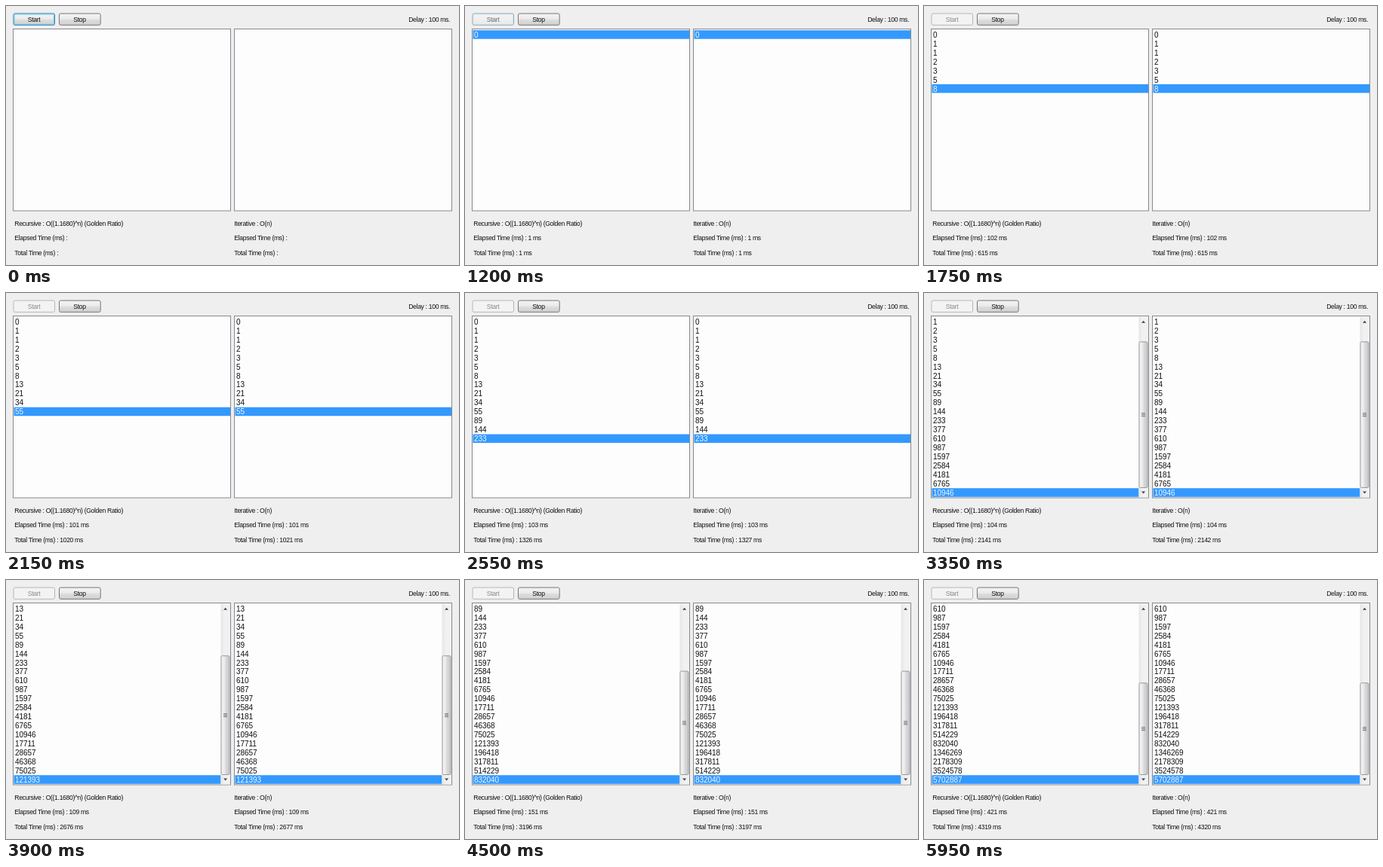
Recreate the animation shown at these times as an HTML page. Size 600 px wide and 344 px high, loop 6000 ms.

```html
<!DOCTYPE html>
<html lang="en">
<head>
<meta charset="utf-8">
<title>Fibonacci: recursive and iterative</title>
<style>
html, body { margin: 0; width: 100%; height: 100%; overflow: hidden; background: #efefef; }
svg { display: block; }
text { font: 8.6px "Liberation Sans", Arial, sans-serif; letter-spacing: -.33px; fill: #111; white-space: pre; }
.num { font-size: 10px; letter-spacing: -.04px; }
.list { fill: #fdfdfd; stroke: #858990; }
.mid { text-anchor: middle; }
</style>
</head>
<body>
<svg width="600" height="344" viewBox="0 0 600 344">
  <defs>
    <linearGradient id="face" x2="0" y2="1">
      <stop stop-color="#f4f4f4"/><stop offset=".48" stop-color="#ebebeb"/>
      <stop offset=".52" stop-color="#dedede"/><stop offset="1" stop-color="#d0d0d0"/>
    </linearGradient>
    <linearGradient id="thumb">
      <stop stop-color="#f6f6f6"/><stop offset=".45" stop-color="#e8e8ea"/>
      <stop offset=".55" stop-color="#d8d8da"/><stop offset="1" stop-color="#cbcbce"/>
    </linearGradient>
    <linearGradient id="track">
      <stop stop-color="#e6e6e6"/><stop offset=".4" stop-color="#f1f1f1"/><stop offset="1" stop-color="#f1f1f1"/>
    </linearGradient>
  </defs>
  <g>
    <rect x="10" y="10" width="54.5" height="15.3" rx="2" fill="#f3f3f3" stroke="#b4b8ba"/>
    <text class="mid" x="37" y="20.9" style="fill:#8b8b8b">Start</text>
  </g>
  <g id="start">
    <rect x="10" y="10" width="54.5" height="15.3" rx="2" fill="url(#face)" stroke="#3c86b5"/>
    <rect x="11" y="11" width="52.5" height="13.3" rx="1.2" fill="none" stroke="#62c8ee"/>
    <text class="mid" x="37" y="20.9">Start</text>
  </g>
  <rect x="70.5" y="10" width="54.7" height="15.3" rx="2" fill="url(#face)" stroke="#777"/>
  <text class="mid" x="97.5" y="20.9">Stop</text>
  <text x="588" y="20.9" text-anchor="end">Delay : 100 ms.</text>
  <g id="left"></g>
  <g id="right"></g>
</svg>
<script>
const LOOP = 6000, BEGIN = 1130, ROWS = 20, ROW = 11.95, TOP = 32.2;
const elapsed = [1, 103, 102, 102, 103, 102, 102, 101, 102, 101, 101, 102, 101, 103,
  101, 101, 101, 101, 102, 102, 103, 104, 105, 106, 107, 108, 109,
  113, 122, 134, 151, 177, 225, 300, 421];
const fib = [0, 1], total = [];
elapsed.forEach((ms, i) => {
  if (i > 1) fib[i] = fib[i - 1] + fib[i - 2];
  total[i] = ms + (total[i - 1] || 0);
});

const $ = id => document.getElementById(id);
const text = (x, y, s, attrs = "") => `<text x="${x}" y="${y}" ${attrs}>${s}</text>`;
const rect = (x, y, w, h, attrs) => `<rect x="${x}" y="${y}" width="${w}" height="${h}" ${attrs}/>`;

function scrollbar(x, count) {
  const h = 213 * ROWS / count, y = 258.5 - h, mid = y + h / 2;
  let out = rect(x + 275, 31.5, 12.5, 240, 'fill="url(#track)"');
  out += rect(x + 275.5, y, 11, h, 'rx="1.5" fill="url(#thumb)" stroke="#999"');
  for (const d of [-2, 0, 2]) out += rect(x + 278.5, mid + d - .4, 5, .9, 'fill="#666"');
  return out + `<path fill="#444" d="M${x + 278.6} 39.8h5l-2.5 -3zM${x + 278.6} 263.6h5l-2.5 3z"/>`;
}

function panel(x, title, count, drift) {
  const last = count - 1, first = Math.max(0, count - ROWS), scrolls = count > ROWS;
  let out = rect(x, 30.5, 288, 241.5, 'class="list"');
  for (let i = first; i < count; i++) {
    const y = TOP + (i - first) * ROW;
    if (i === last) out += rect(x + 1, y, scrolls ? 274 : 286.5, ROW - .4, 'fill="#3399ff"');
    out += text(x + 2.4, y + 9.6, fib[i], `class="num"${i === last ? ' style="fill:#f2f8ff"' : ""}`);
  }
  if (scrolls) out += scrollbar(x, count);
  const time = ms => count ? ms + " ms" : "";
  const tx = x < 100 ? 11.3 : 302.3;
  return out + text(tx, 291.7, title)
    + text(tx, 311.2, "Elapsed Time (ms) : " + time(elapsed[last]))
    + text(tx, 330.8, "Total Time (ms) : " + time(total[last] + drift));
}

let shown = -1;
function draw(t) {
  $("start").style.opacity = Math.min(1, Math.max(0, (1250 - t) / 200));
  const count = total.filter(ms => BEGIN + ms <= t).length;
  if (count === shown) return;
  shown = count;
  $("left").innerHTML = panel(9.5, "Recursive : O((1.1680)^n) (Golden Ratio)", count, 0);
  $("right").innerHTML = panel(302.5, "Iterative : O(n)", count, count > 9 ? 1 : 0);
}

const origin = performance.now();
function tick() {
  draw((performance.now() - origin) % LOOP);
  requestAnimationFrame(tick);
}
tick();
</script>
</body>
</html>
```
